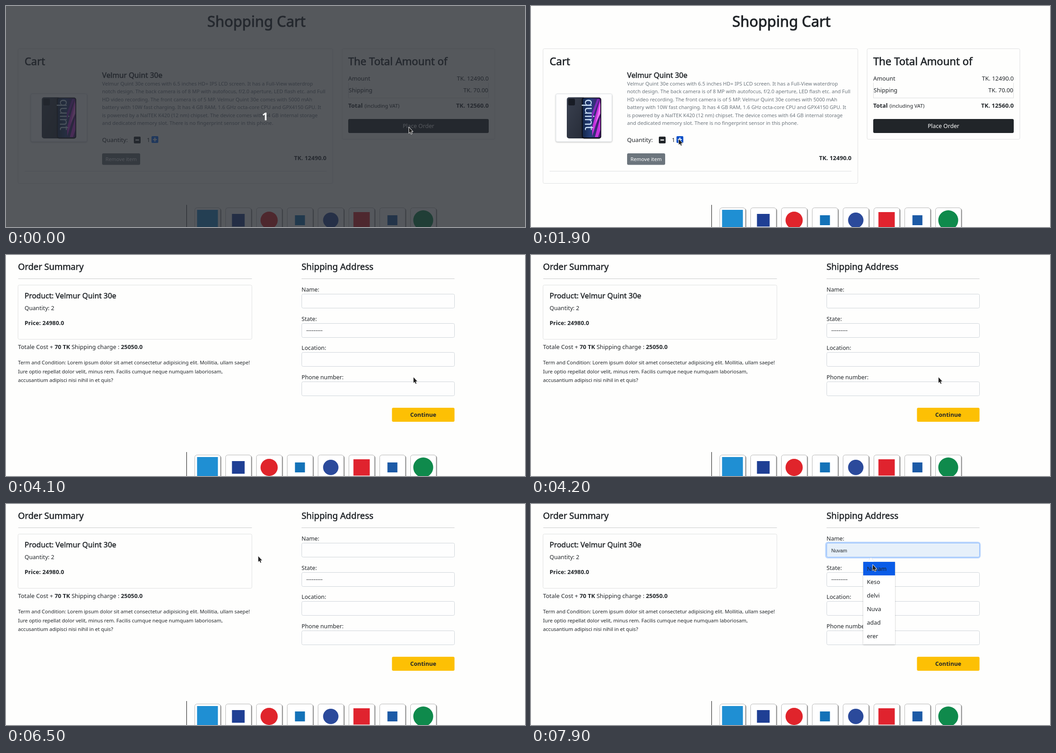
Animation, 1145 px wide and 489 px high, one loop 8000 ms. Source, as an HTML page:

```html
<!DOCTYPE html>
<html lang="en">
<head>
<meta charset="utf-8">
<title>Checkout</title>
<style>
html, body { margin: 0; width: 100%; height: 100%; overflow: hidden; background: #fefefd; }
svg { display: block; width: 1145px; height: 489px; font-family: "Noto Sans", "Open Sans", sans-serif; }
text { fill: #212529; white-space: pre; }
.medium { stroke: #212529; stroke-width: .03em; }
.bold { font-weight: 700; }
.muted { fill: #6c757d; }
.light { fill: #fff; }
.mid { text-anchor: middle; }
.end { text-anchor: end; }
</style>
</head>
<body>
<svg id="stage" viewBox="0 0 1145 489">
  <defs>
    <linearGradient id="screen">
      <stop offset="0" stop-color="#14264a"/><stop offset=".45" stop-color="#26407c"/>
      <stop offset="1" stop-color="#4a1470"/>
    </linearGradient>
    <linearGradient id="back" x2="1" y2="1">
      <stop offset="0" stop-color="#3a4150"/><stop offset="1" stop-color="#252a36"/>
    </linearGradient>
    <filter id="soft" x="-20%" y="-20%" width="140%" height="140%">
      <feDropShadow dx="0" dy="1" stdDeviation="1.5" flood-opacity=".28"/>
    </filter>
  </defs>
  <g id="view"></g>
</svg>
<script>
const PRODUCT = "Velmur Quint 30e";
const LOOP = 8000, STEP = 100;

const text = (x, y, str, size = 12.8, cls = "") =>
  `<text x="${x}" y="${y}" font-size="${size}" class="${cls}">${str}</text>`;
const box = (x, y, w, h, fill, stroke = "none", r = 3, extra = "") =>
  `<rect x="${x}" y="${y}" width="${w}" height="${h}" rx="${r}" fill="${fill}" stroke="${stroke}" ${extra}/>`;
const line = (d, color = "#dcdddf", width = 1) =>
  `<path d="${d}" fill="none" stroke="${color}" stroke-width="${width}"/>`;
const shape = (d, fill) => `<path d="${d}" fill="${fill}"/>`;
const inside = (p, x, y, w, h) => p.x >= x && p.x <= x + w && p.y >= y && p.y <= y + h;

// Pointer path: time, x, y
const PATH = [
  [0, 889, 268], [1100, 890, 267], [1200, 872, 273], [1300, 790, 294], [1400, 650, 313],
  [1500, 500, 317], [1700, 350, 304], [1900, 326, 294],
  [2400, 326, 294], [2500, 350, 312], [2600, 470, 336], [2700, 680, 318], [2800, 850, 275],
  [2900, 920, 253], [3000, 926, 256], [3300, 899, 270],
  [4400, 899, 270], [4500, 906, 272], [4700, 964, 305], [4800, 930, 320], [4900, 740, 317],
  [5100, 280, 250], [5200, 168, 230], [5300, 204, 224], [5600, 248, 206], [5800, 266, 188],
  [6200, 237, 168], [6500, 556.5, 115], [6700, 690, 73], [7000, 736, 99],
  [7600, 736, 99], [7700, 743, 110], [7800, 751, 128], [7900, 754, 134]
];

function pointerAt(t) {
  const i = PATH.findIndex(k => k[0] > t);
  if (i < 0) return { x: 754, y: 134 };
  const [t0, x0, y0] = PATH[i - 1], [t1, x1, y1] = PATH[i];
  const f = (t - t0) / (t1 - t0);
  return { x: x0 + (x1 - x0) * f, y: y0 + (y1 - y0) * f };
}

const CURSORS = {
  arrow: "M0 .5V13L2.7 10.5 4.8 15 6.6 14.2 4.7 9.8H8.5Z",
  hand: "M-1.3 8V1.3a1.3 1.3 0 0 1 2.6 0V6l5 1.2q1.7.5 1.4 2.2l-.9 5.8h-7l-3.9-5.2q-.9-1.4.5-2z",
  beam: "M-2.5-8h5M0-8V8M-2.5 8h5"
};
function cursor(p, kind) {
  const d = CURSORS[kind], at = `transform="translate(${p.x} ${p.y})"`;
  return kind === "beam"
    ? `<path ${at} d="${d}" fill="none" stroke="#222" stroke-width="1.2"/>`
    : `<path ${at} d="${d}" fill="#222" stroke="#fff" stroke-width="1.7" stroke-linejoin="round" paint-order="stroke"/>`;
}

function phone() {
  return box(55, 194.5, 123.5, 105.5, "#fefefe", "#dee2e6", 3, 'filter="url(#soft)"') +
    box(79, 202, 40, 91, "url(#back)", "none", 5) +
    box(82, 205, 15, 15, "#181c25", "none", 3) +
    box(112, 202.5, 43, 91, "#0c0e16", "none", 5) +
    box(114, 204, 39.5, 87, "url(#screen)", "none", 4) +
    shape("M152 207L135 268V288L153 232ZM153 246L141 290H148L153 274Z", "#c532dc") +
    shape("M146 206L134 238V252L151 206Z", "#7d2bb8") +
    shape("M153 213L142 262L153 238Z", "#f06cf4") +
    `<text transform="translate(119 206) rotate(90)" font-size="28" style="fill:#cfe4fb">quint</text>`;
}

const disc = (x, r, fill) => `<circle cx="${x}" cy="474" r="${r}" fill="${fill}"/>`;
const tile = (x, s, fill) => box(x - s / 2, 474 - s / 2, s, s, fill, "none", 0);
const MARKS = [
  [tile, 46, "#1f8fd3"], [tile, 28, "#1f3f94"], [disc, 19, "#e0242b"], [tile, 22, "#1472b8"],
  [disc, 17, "#2b4a9b"], [tile, 36, "#e0232e"], [tile, 22, "#1c5aa6"], [disc, 22, "#0f8a4c"]
];
function payments(dy) {
  const cards = MARKS.map(([draw, size, fill], i) => {
    const x = 416.5 + 68 * i;
    return box(x + 1.5, 448, 57, 60, "#8d8d8d", "none", 5) +
      box(x, 446.5, 56.5, 60, "#fff", "#b5b5b5", 5) + draw(x + 28, size, fill);
  }).join("");
  return `<g transform="translate(0 ${dy})">${line("M398.5 440V500", "#111")}${cards}</g>`;
}

const DETAILS = [
  PRODUCT + " comes with 6.5 inches HD+ IPS LCD screen. It has a Full-View waterdrop",
  "notch design. The back camera is of 8 MP with autofocus, f/2.0 aperture, LED flash etc. and Full",
  "HD video recording. The front camera is of 5 MP. " + PRODUCT + " comes with 5000 mAh",
  "battery with 10W fast charging. It has 4 GB RAM, 1.6 GHz octa-core CPU and GPX4150 GPU. It",
  "is powered by a NalTEK K420 (12 nm) chipset. The device comes with 64 GB internal storage",
  "and dedicated memory slot. There is no fingerprint sensor in this phone."
];

function cartPage(t, p) {
  const two = t >= 2300;
  const overOrder = t >= 200 && inside(p, 755, 250, 310, 31);
  const overPlus = inside(p, 321, 288, 15, 15);
  return text(552.5, 46, "Shopping Cart", 32.3, "medium mid") +
    box(26.5, 94.5, 694.5, 298, "none", "#dfe0e1") +
    box(741.5, 94.5, 337, 200.5, "none", "#dfe0e1") +
    text(41, 131, "Cart", 23, "medium") + phone() +
    text(212, 159, PRODUCT, 16.2, "medium") +
    DETAILS.map((s, i) => text(212, 176 + 17.4 * i, s, 11.12, "muted")).join("") +
    text(212, 300.5, "Quantity:", 13.1) +
    box(282, 289, 15, 15, "#212529", "none", 2) + line("M285.5 296.5h8", "#fff", 2.4) +
    text(310.5, 300.5, two ? 2 : 1, 13) +
    box(321, 288, 15, 15, overPlus ? "#0a50c8" : "#0d6efd", "none", 2) +
    line("M324 295.5h9M328.5 291v9", "#fff", 2.2) +
    box(212, 326, 84, 25.5, "#6c757d") +
    text(254, 342.5, "Remove item", 11.2, "light mid") +
    text(707, 341, "TK. 12490.0", 13, "bold end") +
    line("M41 365.5H707") +
    text(755, 131, "The Total Amount of", 23, "medium") +
    text(755, 164.5, "Amount", 12.9) +
    text(1065, 164.5, two ? "24980" : "TK. 12490.0", 13, "end") +
    line("M755.5 170V203.5H1064.5V170") +
    text(756, 191, "Shipping", 12.6) + text(1064, 191, "TK. 70.00", 12.9, "end") +
    text(755, 225, "Total", 12.9, "bold") + text(791, 225, "(including VAT)", 11.2) +
    text(1065, 225, two ? "25050" : "TK. 12560.0", 13.1, "bold end") +
    box(755, 250, 310, 31, overOrder ? "#1c1f23" : "#212529") +
    text(910, 270, "Place Order", 12.7, "light mid") +
    payments(0);
}

const FIELDS = ["Name:", "State:", "Location:", "Phone number:"];
const CHOICES = ["Nuvam", "Keso", "delvi", "Nuva", "adad", "erer"];

function suggestions(hover) {
  return box(733, 128, 70, 182.5, "#fff", "none", 0, 'filter="url(#soft)"') +
    `<path d="M742 128L750 118.5 758 128" fill="#fff" stroke="#ddd" stroke-width=".7"/>` +
    (hover ? box(733, 128, 70, 30, "#0a5ce8", "none", 0) : "") +
    CHOICES.map((s, i) => text(741, 147.5 + 29.85 * i, s, 12.9)).join("");
}

function shippingPage(t, p) {
  const hover = t >= 7400 && inside(p, 733, 128, 70, 30);
  const fields = FIELDS.map((label, i) => {
    const y = 86.5 + Math.round(64.5 * i), focus = i === 0 && t >= 7300;
    return text(652, y - 5.5, label, 12.7) +
      (focus ? box(650.5, y - 1.5, 340, 34, "none", "#bcd7fd", 5, 'stroke-width="3.2"') : "") +
      box(652.5, y, 337, 31, focus && hover ? "#e6f0fa" : "#fefefe", focus ? "#86b7fe" : "#ced4da");
  }).join("");
  return text(26.5, 33, "Order Summary", 19.2, "medium") +
    text(652, 33, "Shipping Address", 19.35, "medium") +
    line("M27 52.5H542.5M652 52.5H989.5", "#c9cacb") +
    box(26.5, 66.5, 516, 120, "none", "#dfe0e1") +
    text(41, 96, "Product: " + PRODUCT, 16.25, "medium") +
    text(41, 121.5, "Quantity: 2", 12.7) +
    text(41, 154.5, "Price: 24980.0", 12.9, "bold") +
    text(26.5, 208, 'Totale Cost + <tspan class="bold">70 TK</tspan> Shipping charge : <tspan class="bold">25050.0</tspan>', 12.9) +
    text(26.5, 241.5, "Term and Condition: Lorem ipsum dolor sit amet consectetur adipisicing elit. Mollitia, ullam saepe!", 11.12) +
    text(26.5, 261.5, "Iure optio repellat dolor velit, minus rem. Facilis cumque neque numquam laboriosam,", 11.12) +
    text(26.5, 281, "accusantium adipisci nisi nihil in et quis?", 11.12) +
    fields + text(662.5, 170.5, "---------", 12.4) +
    (hover ? `<text x="662.5" y="107" font-size="11" font-family="Liberation Sans, sans-serif">${CHOICES[0]}</text>` : "") +
    box(851.5, 338, 138, 31, "#fdc004") +
    text(920.5, 358, "Continue", 12.6, "bold mid") +
    payments(-4) +
    (t >= 7400 ? suggestions(hover) : "");
}

function cursorKind(t, p) {
  if (t < 4100)
    return t >= 100 && t < 3400 && inside(p, 755, 250, 310, 31) ? "hand" : "arrow";
  const overField = inside(p, 652, 86, 337, 31) || inside(p, 652, 280, 337, 31);
  return overField || inside(p, 27, 230, 512, 54) ? "beam" : "arrow";
}

function scene(t) {
  const p = pointerAt(t);
  const page = t < 4100 ? cartPage(t, p) : shippingPage(t, p);
  const countdown = t < 100
    ? box(0, 0, 1145, 489, "rgba(38,41,48,.78)", "none", 0) + text(571.5, 253, "1", 24, "light bold mid")
    : "";
  return page + countdown + cursor(p, cursorKind(t, p));
}

const view = document.getElementById("view");
let shown = -1;
function tick() {
  const t = Math.floor(performance.now() % LOOP / STEP) * STEP;
  if (t !== shown) view.innerHTML = scene(shown = t);
  requestAnimationFrame(tick);
}
tick();
</script>
</body>
</html>
```
